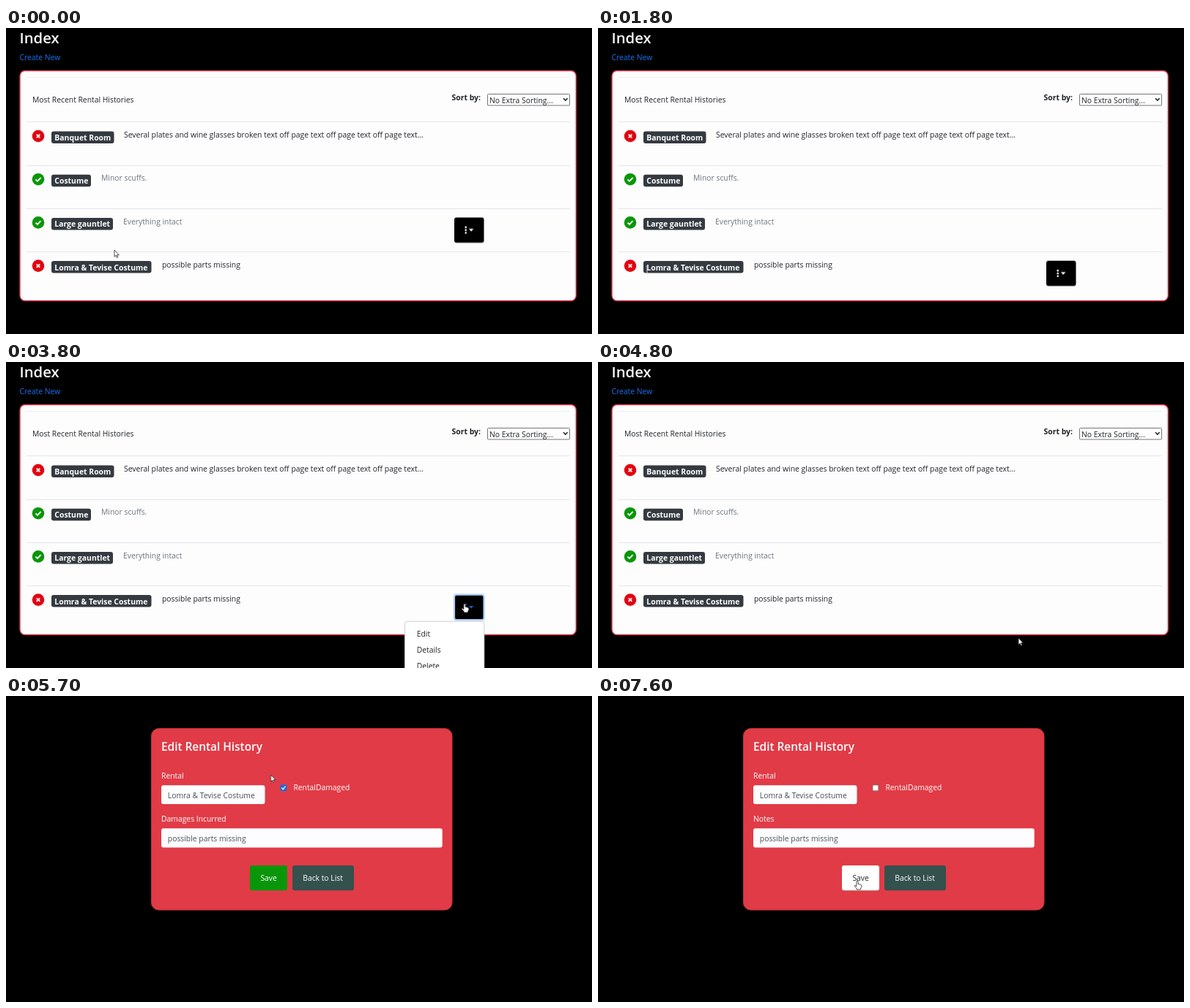
These frames come from a looping animation (800 by 419 pixels, 8 s). An HTML page:

```html
<!DOCTYPE html>
<html lang="en">
<head>
<meta charset="utf-8">
<title>Rental histories</title>
<style>
html, body { margin: 0; width: 100%; height: 100%; overflow: hidden; background: #000; }
svg { display: block; width: 100%; height: 100%; }
text { font: 10.35px "Open Sans", "Noto Sans", sans-serif; fill: #212529; white-space: pre; }
.title { font-size: 20.3px; font-weight: 600; fill: #f8f8f8; }
.head { font-size: 15.4px; font-weight: 600; }
.bold, .badge text { font-weight: 700; font-size: 10.43px; }
.badge text, .form text { fill: #fff; }
.badge rect { fill: #343a40; }
.link { fill: #1a72f0; }
.long { font-size: 10.43px; }
.mute { fill: #6c757d; }
.form .field { fill: #495057; }
.form .dark { fill: #212529; }
.rule { stroke: #e3e5e8; fill: none; }

/* Visibility switches: one 8 s loop, hard changes */
.t { animation: 8s step-end infinite; }
.row3 { animation-name: row3; }
.row4 { animation-name: row4; }
.menu { animation-name: menu; }
.pick { animation-name: pick; }
.form { animation-name: form; }
.damaged { animation-name: damaged; }
.intact { animation-name: intact; }
.hover { animation-name: hover; }
.arrow { animation-name: arrow; }
.beam { animation-name: beam; }
.hand { animation-name: hand; }
@keyframes row3 { 0% { opacity: 1 } 3.75%, 100% { opacity: 0 } }
@keyframes row4 { 0% { opacity: 0 } 3.75% { opacity: 1 } 58.75%, 100% { opacity: 0 } }
@keyframes menu { 0% { opacity: 0 } 46.25% { opacity: 1 } 58.75%, 100% { opacity: 0 } }
@keyframes pick { 0% { opacity: 0 } 53.75% { opacity: 1 } 58.75%, 100% { opacity: 0 } }
@keyframes form { 0% { opacity: 0 } 61.25%, 100% { opacity: 1 } }
@keyframes damaged { 0% { opacity: 1 } 78.75%, 100% { opacity: 0 } }
@keyframes intact { 0% { opacity: 0 } 78.75%, 100% { opacity: 1 } }
@keyframes hover { 0% { opacity: 0 } 91.25%, 100% { opacity: 1 } }
@keyframes arrow {
  0% { opacity: 1 } 11.25% { opacity: 0 } 25% { opacity: 1 } 28.75% { opacity: 0 }
  33.75% { opacity: 1 } 43.75% { opacity: 0 } 58.75% { opacity: 1 } 91.25%, 100% { opacity: 0 }
}
@keyframes beam {
  0% { opacity: 0 } 11.25% { opacity: 1 } 25% { opacity: 0 } 28.75% { opacity: 1 } 33.75%, 100% { opacity: 0 }
}
@keyframes hand {
  0% { opacity: 0 } 43.75% { opacity: 1 } 58.75% { opacity: 0 } 91.25%, 100% { opacity: 1 }
}

/* Pointer path: one step per 100 ms */
.pointer { animation: path 8s infinite; }
@keyframes path {
  0% { transform: translate(148px, 304px); animation-timing-function: steps(3) }
  3.75% { transform: translate(142px, 311px); animation-timing-function: steps(8) }
  13.75% { transform: translate(74.5px, 332px); animation-timing-function: steps(8) }
  23.75% { transform: translate(66px, 331px); animation-timing-function: steps(2) }
  26.25% { transform: translate(36px, 328px); animation-timing-function: steps(2) }
  28.75% { transform: translate(72px, 330px); animation-timing-function: steps(4) }
  33.75% { transform: translate(180px, 338px); animation-timing-function: steps(1) }
  35% { transform: translate(301.5px, 343px); animation-timing-function: steps(3) }
  38.75% { transform: translate(460px, 349px); animation-timing-function: steps(4) }
  43.75% { transform: translate(609px, 339px); animation-timing-function: steps(2) }
  46.25% { transform: translate(626px, 331px); animation-timing-function: steps(1) }
  47.5% { transform: translate(626px, 331px); animation-timing-function: steps(3) }
  51.25% { transform: translate(606px, 360px); animation-timing-function: steps(3) }
  55% { transform: translate(574px, 378px); animation-timing-function: steps(1) }
  63.75% { transform: translate(574px, 378px); animation-timing-function: steps(4) }
  68.75% { transform: translate(428px, 190px); animation-timing-function: steps(2) }
  71.25% { transform: translate(361.5px, 108px); animation-timing-function: steps(1) }
  72.5% { transform: translate(358px, 101px); animation-timing-function: steps(2) }
  75% { transform: translate(380px, 124px); animation-timing-function: steps(1) }
  83.75% { transform: translate(380px, 124px); animation-timing-function: steps(5) }
  90% { transform: translate(334px, 222px); animation-timing-function: steps(2) }
  92.5% { transform: translate(342px, 250px); animation-timing-function: steps(2) }
  95%, 100% { transform: translate(354px, 253px) }
}
</style>
</head>
<body>
<svg viewBox="0 0 800 419" preserveAspectRatio="none">
  <defs>
    <g id="bad">
      <circle r="8.3" fill="#e4000f"/>
      <path d="M-2.3-2.3 2.3 2.3M2.3-2.3-2.3 2.3" stroke="#fff" stroke-width="1.8"/>
    </g>
    <g id="good">
      <circle r="8.3" fill="#0a960a"/>
      <path d="M-3.5.2-1.1 2.6 3.6-2.2" fill="none" stroke="#fff" stroke-width="1.8"/>
    </g>
    <g id="dots">
      <circle cx="15.7" cy="13.4" r="1.3"/>
      <circle cx="15.7" cy="17.2" r="1.3"/>
      <circle cx="15.7" cy="21" r="1.3"/>
      <path d="M19.8 15.4H26.4L23.1 18.9Z"/>
    </g>
    <g id="more">
      <rect width="40.5" height="34.5" rx="3"/>
      <use href="#dots" fill="#fff"/>
    </g>
  </defs>

  <rect width="800" height="419"/>
  <text class="title" x="18.5" y="20.5">Index</text>
  <text class="link" x="18.5" y="43.5">Create New</text>
  <rect x="19" y="58.5" width="759.3" height="315" rx="7" fill="#fefdfe" stroke="#dc3545" stroke-width="1.4"/>
  <path class="rule" d="M28 67.5H770" opacity=".6"/>
  <path class="rule" d="M28 128.5H770M28 188.5H770M28 247.5H770M28 306.5H770"/>

  <text x="36" y="102">Most Recent Rental Histories</text>
  <text class="bold" x="608.5" y="99.4">Sort by:</text>
  <rect x="657.5" y="90.5" width="112" height="15.5" rx="1" fill="#fff" stroke="#767676"/>
  <text x="660" y="102.5">No Extra Sorting...</text>
  <path d="M761 96.3 763.8 99.2 766.6 96.3" fill="none" stroke="#111" stroke-width="1.4"/>

  <g>
    <use href="#bad" x="44" y="148"/>
    <g class="badge"><rect x="62" y="141.5" width="85.5" height="16.5" rx="3"/><text x="66.3" y="154">Banquet Room</text></g>
    <text class="long" x="161" y="150.3">Several plates and wine glasses broken text off page text off page text off page text...</text>
  </g>
  <g transform="translate(0 59.2)">
    <use href="#good" x="44" y="148"/>
    <g class="badge"><rect x="62" y="141.5" width="54" height="16.5" rx="3"/><text x="66.3" y="154">Costume</text></g>
    <text class="mute" x="130" y="150.3">Minor scuffs.</text>
  </g>
  <g transform="translate(0 118.4)">
    <use href="#good" x="44" y="148"/>
    <g class="badge"><rect x="62" y="141.5" width="84" height="16.5" rx="3"/><text x="66.3" y="154">Large gauntlet</text></g>
    <text class="mute" x="160" y="150.3">Everything intact</text>
  </g>
  <g transform="translate(0 177.6)">
    <use href="#bad" x="44" y="148"/>
    <g class="badge"><rect x="62" y="141.5" width="136.5" height="16.5" rx="3"/><text x="66.3" y="154">Lomra &amp; Tevise Costume</text></g>
    <text x="213" y="150.3">possible parts missing</text>
  </g>

  <use class="t row3" href="#more" transform="translate(612 259.5)"/>
  <use class="t row4" href="#more" transform="translate(612 318.7)"/>

  <g class="t menu">
    <rect x="612" y="318.7" width="40.5" height="34.5" rx="3" stroke="#a9cdf8" stroke-width="2.2"/>
    <use href="#dots" transform="translate(612 318.7)" fill="#1d5fc4"/>
    <rect x="544.5" y="355.2" width="108.3" height="80" rx="3" fill="#fff" stroke="#cfcfcf"/>
    <rect class="t pick" x="545" y="361.5" width="107.3" height="21.8" fill="#f8f9fa"/>
    <text x="560.7" y="376.3">Edit</text>
    <text x="560.7" y="398.2">Details</text>
    <text x="560.7" y="420.1">Delete</text>
  </g>

  <g class="t form">
    <rect width="800" height="419"/>
    <rect x="198.5" y="44.5" width="410.5" height="248.5" rx="10" fill="#e13b47" stroke="#c4333e"/>
    <text class="head" x="212" y="74.7">Edit Rental History</text>
    <text x="212" y="112.8">Rental</text>
    <rect x="212" y="122.2" width="141.5" height="25.8" rx="3" fill="#fdfdff"/>
    <text class="field" x="220.8" y="139.7">Lomra &amp; Tevise Costume</text>
    <text x="392.4" y="129">RentalDamaged</text>
    <rect x="212" y="181.2" width="383.7" height="26.2" rx="3" fill="#fdfdff"/>
    <text class="field" x="220.8" y="199">possible parts missing</text>

    <g class="t damaged">
      <rect x="374.5" y="121.5" width="8.6" height="8.6" rx="1.4" fill="#0d6fe8"/>
      <path d="M376.3 125.8 378.2 127.7 381.4 123.7" fill="none" stroke="#fff" stroke-width="1.3"/>
      <text x="212" y="171.7">Damages Incurred</text>
    </g>
    <g class="t intact">
      <rect x="375" y="122" width="7.8" height="7.8" rx="1.2" fill="#fff" stroke="#767676" stroke-width=".8"/>
      <text x="212" y="171.7">Notes</text>
    </g>

    <rect x="333" y="232" width="51" height="34.2" rx="3" fill="#0a960a"/>
    <text x="347.4" y="253.4">Save</text>
    <g class="t hover">
      <rect x="333" y="232" width="51" height="34.2" rx="3" fill="#fff"/>
      <text class="dark" x="347.4" y="253.4">Save</text>
    </g>
    <rect x="391" y="232" width="84" height="34.2" rx="3" fill="#34514e"/>
    <text x="405.2" y="253.4">Back to List</text>
  </g>

  <g class="pointer" stroke="#222" stroke-width=".8" fill="#fff">
    <path class="t arrow" d="M0 0V9.2L2.1 7.3 3.5 10.4 4.9 9.8 3.5 6.8H6.3Z"/>
    <path class="t beam" d="M-1.8-5Q0-5 0-4Q0-5 1.8-5M0-4V4M-1.8 5Q0 5 0 4Q0 5 1.8 5" fill="none" stroke="#ccc" stroke-width="1"/>
    <path class="t hand" d="M-1.1.8Q0-.9 1.1.8V4.3L2.9 4.7 4.6 5.2 5.8 6V8.5L4.6 10.6V12H-.9V10.6L-4 7.2Q-3.6 5.7-2.3 6.6L-1.1 7.6Z"/>
  </g>
</svg>
</body>
</html>
```
